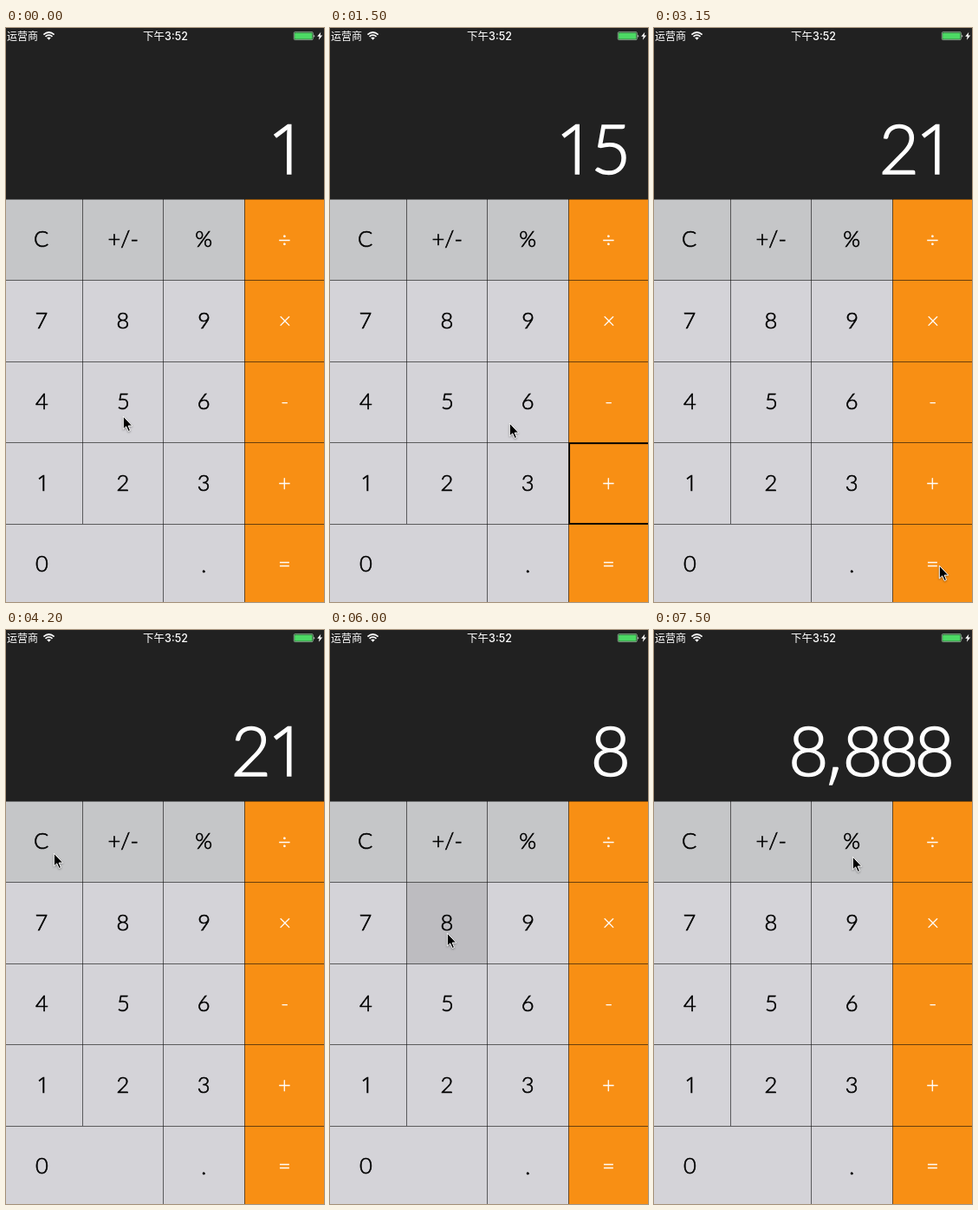
An HTML page that plays this animation: 367 px wide and 661 px high, repeating every 8 s.

```html
<!DOCTYPE html>
<html lang="zh">
<head>
<meta charset="utf-8">
<title>Calculator</title>
<style>
  html, body { margin: 0; width: 100%; height: 100%; overflow: hidden; background: #212121; }
  svg { display: block; width: 100vw; height: 100vh; }
  .status { fill: #fff; font-family: Inter, "Noto Sans CJK SC", "Noto Sans CJK", sans-serif; }
</style>
</head>
<body>
<svg id="stage" viewBox="0 0 367 661" preserveAspectRatio="none">
  <rect width="367" height="661" fill="#212121"/>
  <g class="status">
    <text x="1" y="13.5" font-size="12" font-weight="300">运营商</text>
    <text x="184" y="13.5" font-size="12.5" font-weight="500" text-anchor="middle">下午3:52</text>
    <g fill="none" stroke="#fff" stroke-width="1.7">
      <path d="M43.4 7.6Q49.5 2.4 55.6 7.6"/>
      <path d="M45.5 9.9Q49.5 6.5 53.5 9.9"/>
    </g>
    <path d="M47.2 11.3Q49.5 9.5 51.8 11.3L49.5 13.7Z"/>
    <rect x="332.3" y="4.6" width="22" height="9" rx="1.2" fill="none" stroke="#a9d8b0" stroke-width=".7"/>
    <rect x="333.1" y="5.4" width="20.4" height="7.4" rx=".5" fill="#4cd964"/>
    <path d="M355.4 7.5Q357.2 9.2 355.4 11Z"/>
    <path d="M363.3 4.8L359.2 9.8H361.7L360.9 13.8L365.2 8.5H362.6Z"/>
  </g>
  <g id="screen" fill="#fff" stroke="#fff" stroke-width="1.6"></g>
  <g id="keys"></g>
  <path d="M0 197.5H367M0 290.5H367M0 384.5H367M0 477.5H367M0 571.5H367M88.5 197V571M181.5 197V661M275.5 197V661"
    fill="none" stroke="#000" stroke-opacity=".46"/>
  <rect id="ring" x="276.2" y="478.3" width="100" height="92.5" fill="none" stroke="#000" stroke-width="1.7"/>
  <g id="labels"></g>
  <path id="cursor" d="M0 0V15L3.4 11.9L5.9 17.5L8.2 16.5L5.8 11.1H10.4Z" stroke="#fff" stroke-width="1"
    style="filter:drop-shadow(0 1px 1px rgba(0,0,0,.35))"/>
</svg>
<script>
const LOOP = 8000, STEP = 150;
const $ = id => document.getElementById(id);
const pen = document.createElement("canvas").getContext("2d");

function add(parent, tag, attrs) {
  const el = document.createElementNS("http://www.w3.org/2000/svg", tag);
  for (const k in attrs) el.setAttribute(k, attrs[k]);
  return parent.appendChild(el);
}

// Centres the inked part of a text on cx, and on cy unless a baseline is given.
function glyph(parent, str, size, cx, cy, baseline) {
  const family = /^[1,]$/.test(str) ? '"Open Sans", sans-serif' : "Lato, sans-serif";
  pen.font = `300 ${size}px ${family}`;
  const m = pen.measureText(str);
  const x = cx - (m.actualBoundingBoxRight - m.actualBoundingBoxLeft) / 2;
  const y = baseline || cy + (m.actualBoundingBoxAscent - m.actualBoundingBoxDescent) / 2;
  const el = add(parent, "text", {
    x, y, "font-size": size, "font-weight": 300, "font-family": family
  });
  el.textContent = str;
  return el;
}

const KEY_SIZE = 25.5;
const ink = color => ({ fill: color, stroke: color, "stroke-width": color === "#000" ? .65 : .35 });
const colX = [0, 88.5, 181.5, 275.5, 367], rowY = [197, 290.5, 384.5, 477.5, 571.5, 661];
const midX = [41, 135, 228.3, 321.6], midY = [243, 336.8, 430.3, 523.7, 617.2];
const layout = [["C", "+/-", "%", "÷"], ["7", "8", "9", "×"], ["4", "5", "6", "-"],
  ["1", "2", "3", "+"], ["0", "", ".", "="]];
const shades = {};

layout.forEach((row, r) => row.forEach((name, c) => {
  if (!name) return;
  const op = c === 3;
  const box = {
    x: colX[c], y: rowY[r], height: rowY[r + 1] - rowY[r],
    width: colX[name === "0" ? 2 : c + 1] - colX[c]
  };
  add($("keys"), "rect", { ...box, fill: op ? "#f88f14" : r ? "#d4d3d8" : "#c5c6c8" });
  shades[name] = add($("keys"), "rect", { ...box, fill: "#000", "fill-opacity": .11 });
  if (name === "C") return;
  const cy = midY[r] + (name === "." ? 7.8 : name === "-" ? 2 : op ? .6 : 0);
  const g = add($("labels"), "g", ink(op ? "#fff" : "#000"));
  glyph(g, name, KEY_SIZE, midX[c], cy);
}));

const clear = add($("labels"), "g", ink("#000"));
const clearOne = glyph(clear, "C", KEY_SIZE, midX[0], midY[0]);
const clearAll = glyph(clear, "AC", KEY_SIZE, midX[0], midY[0]);

const values = [[0, "1"], [300, "15"], [2250, "6"], [3150, "21"], [4500, "0"],
  [5700, "8"], [6150, "88"], [6600, "888"], [6900, "8,888"]];
const presses = [[150, "5"], [1200, "+"], [2100, "6"], [3000, "="], [4350, "C"],
  [5550, "8"], [6000, "8"], [6450, "8"]];
const path = [[0, 136, 447], [300, 136, 447], [1050, 331, 512], [1350, 331, 512],
  [1500, 208, 455], [1950, 230, 450], [2250, 230, 450], [2850, 330, 619],
  [3300, 330, 619], [4200, 56, 257], [4500, 56, 257], [4650, 72, 296],
  [4800, 146, 318], [4950, 150, 473], [5100, 148, 430], [5250, 138, 360],
  [5400, 136, 349], [6900, 136, 349], [7500, 230, 261], [LOOP, 230, 261]];

let shown = "";
function showValue(str) {
  if (str === shown) return;
  shown = str;
  $("screen").replaceChildren();
  let x = 323.7;
  for (const ch of [...str].reverse()) {
    const shift = ch === "1" ? -4.5 : ch === "," ? 8 : 0;
    glyph($("screen"), ch, 79.5, x + shift, 0, 167.6);
    x -= ch === "," ? 21 : 41.5;
  }
}

function cursorAt(t) {
  const i = path.findIndex(p => p[0] > t);
  const [t0, x0, y0] = path[i - 1], [t1, x1, y1] = path[i];
  const u = (t - t0) / (t1 - t0), k = u * u * (3 - 2 * u);
  return [x0 + (x1 - x0) * k - .7, y0 + (y1 - y0) * k];
}

const toggle = (el, on) => el.setAttribute("visibility", on ? "visible" : "hidden");

function draw(time) {
  const t = Math.floor(time % LOOP / STEP) * STEP;
  showValue(values.filter(v => v[0] <= t).pop()[1]);
  const press = presses.find(p => t >= p[0] && t < p[0] + STEP);
  for (const name in shades) toggle(shades[name], press && press[1] === name);
  const cleared = t >= 4500 && t < 5700;
  toggle(clearAll, cleared);
  toggle(clearOne, !cleared);
  toggle($("ring"), t >= 1350 && t < 2250);
  $("cursor").setAttribute("transform", `translate(${cursorAt(t)})`);
}

const start = performance.now();
function tick() {
  draw(performance.now() - start);
  requestAnimationFrame(tick);
}
tick();
</script>
</body>
</html>
```
